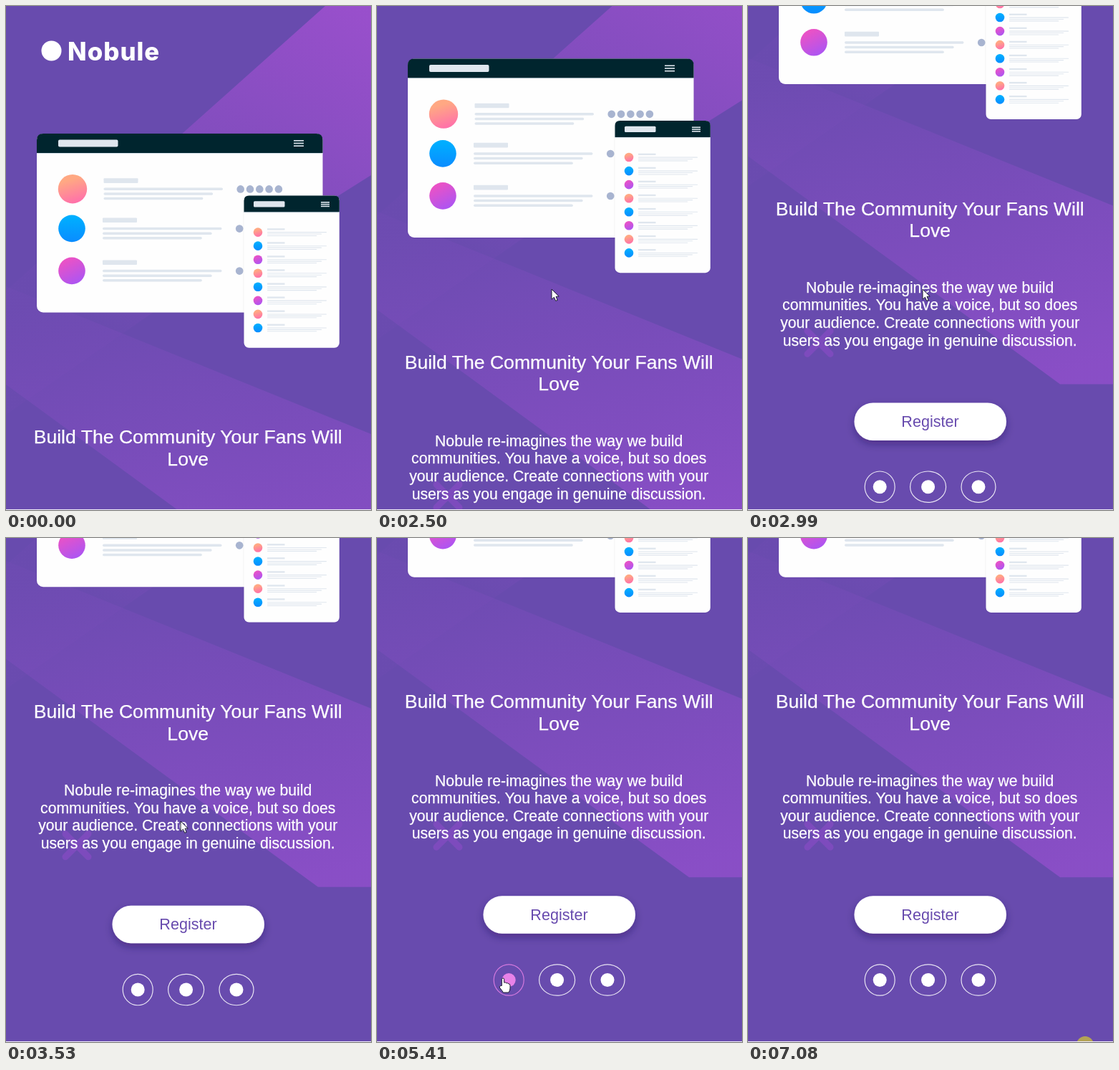
An HTML page for the animation above (7130 ms loop, 510 by 703 pixels).

```html
<!DOCTYPE html>
<html lang="en">
<head>
<meta charset="utf-8">
<title>Community landing page</title>
<style>
  html, body { margin: 0; width: 100%; height: 100%; overflow: hidden; background: #684bae; }
  svg { display: block; }
  text { font-family: "Liberation Sans", Arial, sans-serif; fill: #fff; text-anchor: middle; }
  .logo { font: 800 34.8px Inter, sans-serif; letter-spacing: 1px; text-anchor: start; }
  .title { font-size: 26.6px; }
  .body { font-size: 21.2px; }
  .title, .body { stroke: #fff; stroke-width: .25px; }
</style>
</head>
<body>
<svg width="510" height="703" viewBox="0 0 510 703">
  <defs>
    <linearGradient id="beam" gradientUnits="userSpaceOnUse" x1="480" y1="0" x2="170" y2="470">
      <stop offset="0" stop-color="#a050d0" stop-opacity=".86"/>
      <stop offset="1" stop-color="#a050d0" stop-opacity=".04"/>
    </linearGradient>
    <linearGradient id="band" gradientUnits="userSpaceOnUse" x1="200" y1="370" x2="330" y2="860">
      <stop offset="0" stop-color="#9a50d2" stop-opacity=".06"/>
      <stop offset="1" stop-color="#9a50d2" stop-opacity=".66"/>
    </linearGradient>
    <linearGradient id="orange" x1=".3" y1="0" x2=".6" y2="1">
      <stop offset=".2" stop-color="#ffa883"/><stop offset="1" stop-color="#ff6fab"/>
    </linearGradient>
    <linearGradient id="blue" x1="0" y1="0" x2="0" y2="1">
      <stop offset=".1" stop-color="#00aeff"/><stop offset="1" stop-color="#0a8cff"/>
    </linearGradient>
    <linearGradient id="pink" x1=".25" y1="0" x2=".75" y2="1">
      <stop offset=".1" stop-color="#ea52c6"/><stop offset="1" stop-color="#a955f5"/>
    </linearGradient>
    <filter id="soft" x="-20%" y="-40%" width="140%" height="220%">
      <feDropShadow dx="0" dy="5" stdDeviation="6" flood-color="#1c0a48" flood-opacity=".36"/>
    </filter>
    <filter id="edge" x="-10%" y="-10%" width="120%" height="120%">
      <feDropShadow dx="0" dy="0" stdDeviation="1" flood-color="#334" flood-opacity=".12"/>
    </filter>
  </defs>
  <rect width="510" height="703" fill="#684bae"/>
  <g id="page">
    <path d="M446 0H510V236L206 427L0 570V397Z" fill="url(#beam)"/>
    <path d="M0 391L510 597V846H436L0 528Z" fill="url(#band)"/>
    <path d="M83 772L115 804M115 772L83 804" stroke="#7d4bbd" stroke-width="9" stroke-linecap="round"/>
    <circle cx="63.5" cy="62.5" r="14" fill="#fff"/>
    <text class="logo" x="86" y="75.7">Nobule</text>
    <g id="cards"></g>
    <g id="copy"></g>
    <rect id="button" x="148.5" y="872" width="212.5" height="52.5" rx="26.2" filter="url(#soft)"/>
    <text id="label" x="254.5" y="905.5" font-size="21.6">Register</text>
    <g id="social"></g>
  </g>
  <g fill="#fff" stroke="#1c1c30" stroke-linejoin="round">
    <path id="arrow" d="M0 0V14.2L3.4 11.2L5.7 16.4L8.2 15.3L6 10.3L10.2 10Z"/>
    <path id="hand" d="M-1.7 10.5V1.4Q-1.6 0 0 0Q1.6 0 1.7 1.4V6.2Q4 5.2 5 7Q7 6 8 8Q10 7.6 10 10V14Q10 17 8 20H.4Q-.6 18-4.6 13.2Q-5.4 11-3.2 10.6Z"/>
  </g>
  <circle id="click" cx="471" cy="707" r="12" fill="#b4a354"/>
  <rect y="702" width="510" height="1" fill="#eeeaf6"/>
</svg>
<script>
const LOOP = 7130, STEP = 70, GREY = "#dfe6ee";
const $ = id => document.getElementById(id);
const hues = ["orange", "blue", "pink"];
const repeat = (n, fn) => Array.from({ length: n }, (_, i) => fn(i)).join("");

const rect = (x, y, w, h, fill = GREY, r = 0) =>
  `<rect x="${x}" y="${y}" width="${w}" height="${h}" rx="${r}" fill="${fill}"/>`;
const disc = (x, y, r, fill) => `<circle cx="${x}" cy="${y}" r="${r}" fill="${fill}"/>`;
const burger = (x, y, w, gap) => repeat(3, i => rect(x, y + i * gap, w, 1.6));

// Three text bars, each shorter than the one above.
const bars = (x, y, w, h, gap) =>
  repeat(3, i => rect(x, y + i * gap, w * (1 - i * .083), h, GREY, h / 2));

function panel(x, y, w, h, head, r) {
  return `<g filter="url(#edge)">${rect(x, y, w, h, "#fefefe", r)}</g>` +
    `<path d="M${x} ${y + head}V${y + r}q0 ${-r} ${r} ${-r}h${w - 2 * r}q${r} 0 ${r} ${r}V${y + head}Z" fill="#00252e"/>` +
    rect(x, y + head, w, .8, "#c9d6e2");
}

function desktopRow(i) {
  const first = i === 0, y = 252 + i * 59, x = first ? 136.5 : 135;
  const mid = first ? 255.2 : y - .6;
  return disc(first ? 93 : 92, mid, first ? 20.2 : 18.8, `url(#${hues[i]})`) +
    rect(x, mid - 15, 48, 6.7, GREY, 1) + bars(x, mid - 1.6, 166.5, 3.5, 6.6) +
    repeat(5, k => disc(x + 191.2 + k * 13.3, mid + .2, 5.3, "#a8b4d0"));
}

function phoneRow(i) {
  const y = 315.6 + i * 19.05;
  return disc(352, y, 6.3, `url(#${hues[i % 3]})`) +
    rect(365, y - 5.4, 24.5, 2.3) + bars(365, y - .5, 83, 1.1, 2.4);
}

$("cards").innerHTML =
  panel(43, 178, 399.5, 249.5, 27, 9) + rect(73, 186.5, 83.5, 10, GREY, 2) +
  burger(402, 187, 14, 3.7) + repeat(3, desktopRow) +
  panel(332.5, 264.5, 133.3, 212.2, 23, 7) + rect(346, 272.2, 43.5, 8.4, GREY, 1.5) +
  burger(440, 273, 12, 2.8) + repeat(8, phoneRow);

const lines = (cls, y, gap, rows) =>
  rows.map((t, i) => `<text class="${cls}" x="254.2" y="${y + i * gap}">${t}</text>`).join("");

$("copy").innerHTML =
  lines("title", 610.3, 30.7, ["Build The Community Your Fans Will", "Love"]) +
  lines("body", 718.4, 24.6, [
    "Nobule re-imagines the way we build",
    "communities. You have a voice, but so does",
    "your audience. Create connections with your",
    "users as you engage in genuine discussion."
  ]);

const ringY = 989.3, ringH = 21.7;
const rings = [{ x: 184.2, r: 21 }, { x: 251.6, r: 25 }, { x: 322, r: 24 }];
$("social").innerHTML = rings.map(({ x, r }) =>
  `<g><ellipse cx="${x}" cy="${ringY}" rx="${r}" ry="${ringH}" fill="none" stroke-width="1.2" stroke-opacity=".85"/>` +
  `<circle cx="${x}" cy="${ringY}" r="9.5" stroke="none"/></g>`).join("");

const clamp = v => Math.max(0, Math.min(1, v));
const ramp = (t, from, length) => clamp((t - from) / length);
const easeOut = f => 1 - (1 - f) ** 3;
const mix = (a, b, f) => `rgb(${a.map((v, i) => Math.round(v + (b[i] - v) * f))})`;
const white = [255, 255, 255], violet = [104, 75, 174], rose = [232, 130, 232];

// Each wheel notch scrolls by the same amount until the page ends.
const NOTCH = 106.2, LAST = 54.2;
const scrollAt = t =>
  [0, 1, 2].reduce((sum, i) => sum + NOTCH * easeOut(ramp(t, 2290 + 210 * i, 280)), 0) +
  LAST * ramp(t, 3320, 280);

// Cursor strokes: quadratic curves, each starting where the last one ended.
const origin = [484, 316];
const strokes = [
  { from: 220, to: 920, bend: [440, -10], end: [226, 15] },
  { from: 920, to: 1690, bend: [95, 70], end: [157, 209] },
  { from: 1690, to: 2030, bend: [193, 280], end: [244, 395] },
  { from: 3880, to: 4640, bend: [206, 514], end: [181, 537] },
  { from: 4640, to: 5410, bend: [188, 560], end: [176, 614] },
  { from: 5410, to: 6180, bend: [410, 628], end: [258, 619] },
  { from: 6180, to: 6840, bend: [340, 620], end: [453, 698] }
];

const cursorAt = t => strokes.reduce((p, { from, to, bend, end }) => {
  const f = ramp(t, from, to - from), g = 1 - f;
  return p.map((v, i) => g * g * v + 2 * f * g * bend[i] + f * f * end[i]);
}, origin);

// The picture changes in bursts, every STEP ms from the start of each.
const bursts = [0, 220, 990, 1750, 2360, 3390, 3950, 4710, 5480, 6280, 7080];
const SLACK = 10;

function sampled(time) {
  const start = bursts.filter(b => b <= time).pop();
  return start + Math.floor((time - start + SLACK) / STEP) * STEP;
}

const inRing = (x, y, ring) => ((x - ring.x) / ring.r) ** 2 + ((y - ringY) / ringH) ** 2 < 1;
const inButton = (x, y) => x > 149 && x < 361 && y > 872 && y < 924;
const show = (el, on) => el.setAttribute("visibility", on ? "visible" : "hidden");
const move = (el, x, y) => el.setAttribute("transform", `translate(${x} ${y})`);

function draw(time) {
  const t = sampled(time), scroll = scrollAt(t);
  const [x, y] = cursorAt(t), pageY = y + scroll;

  move($("page"), 0, -scroll);
  const press = ramp(t, 4300, 280) - ramp(t, 4920, 280);
  $("button").setAttribute("fill", mix(white, rose, press));
  $("label").style.fill = mix(violet, white, press);

  const over = rings.map(ring => inRing(x, pageY, ring));
  [...$("social").children].forEach((g, i) => {
    const color = mix(white, rose, over[i] ? 1 : 0);
    g.setAttribute("fill", color);
    g.setAttribute("stroke", color);
  });

  const visible = t >= 220 && t < 6840;
  const link = inButton(x, pageY) || over.includes(true);
  move($("arrow"), x, y);
  move($("hand"), x, y);
  show($("arrow"), visible && !link);
  show($("hand"), visible && link);
  show($("click"), t >= 7080);
}

function tick() {
  draw(performance.now() % LOOP);
  requestAnimationFrame(tick);
}
tick();
</script>
</body>
</html>
```
